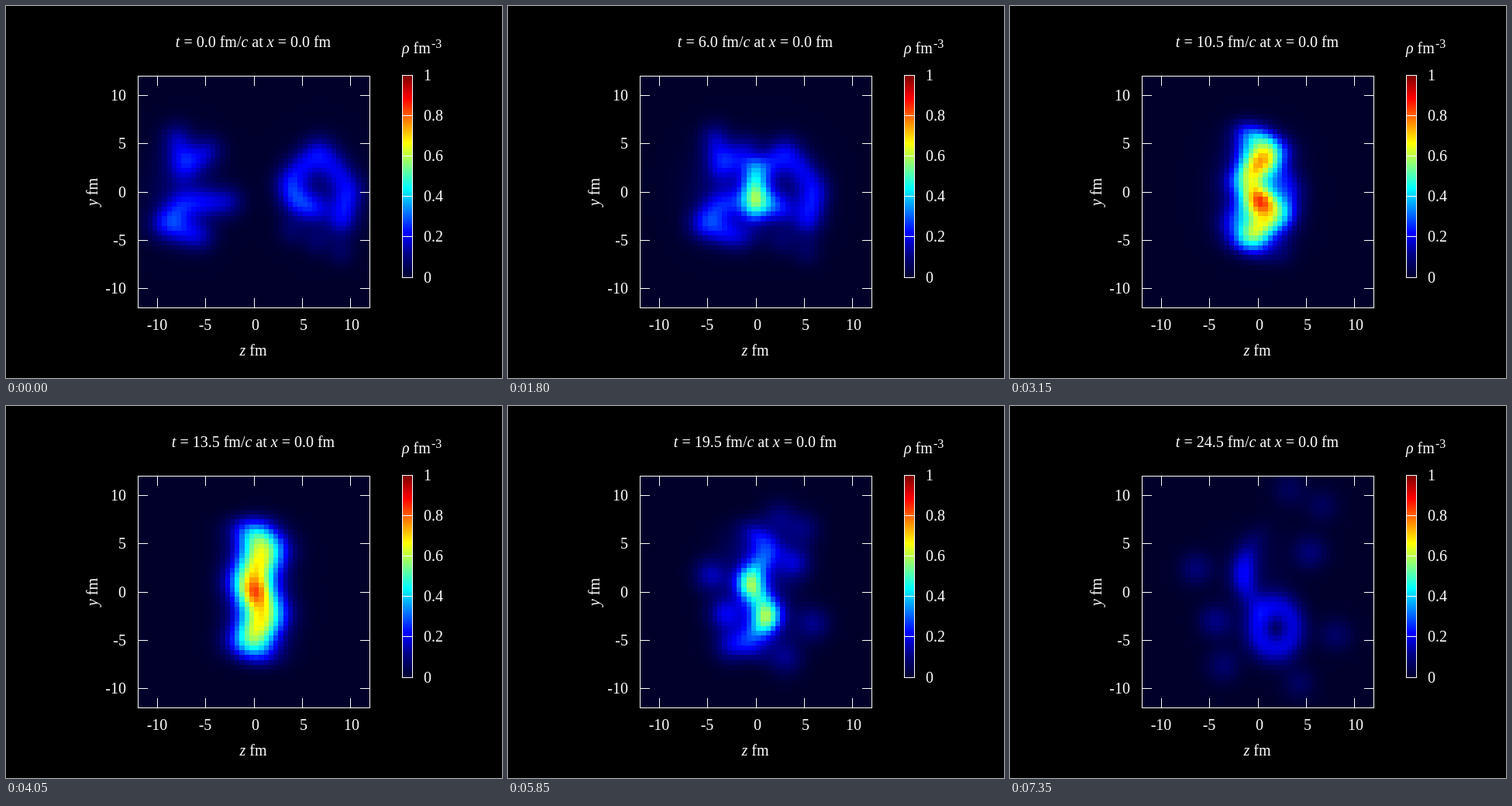
Animation of 640 by 480 pixels, one loop 7.5 s. Source, as an HTML page with a canvas:

```html
<!DOCTYPE html>
<html lang="en">
<head>
<meta charset="utf-8">
<title>Density in a nuclear collision</title>
<style>
  html, body { margin: 0; width: 100%; height: 100%; overflow: hidden; background: #000; }
  canvas, svg { position: absolute; left: 0; top: 0; width: 640px; height: 480px; }
  text { font: 20px "Liberation Serif", "Times New Roman", serif; fill: #fff; }
  .var { font-style: italic; }
  .mid { text-anchor: middle; }
  .end { text-anchor: end; }
  .sup { font-size: 16px; }
  path { fill: none; stroke: #fff; stroke-width: 1; shape-rendering: crispEdges; }
</style>
</head>
<body>
<canvas id="map" width="640" height="480"></canvas>
<svg id="axes" viewBox="0 0 640 480">
  <path id="lines"/>
  <text class="mid" x="319" y="53"><tspan class="var">t</tspan> = <tspan id="clock">0.0</tspan> fm/<tspan class="var">c</tspan> at <tspan class="var">x</tspan> = 0.0 fm</text>
  <text class="mid" x="319" y="451"><tspan class="var">z</tspan> fm</text>
  <text class="mid" transform="translate(118 240) rotate(-90)"><tspan class="var">y</tspan> fm</text>
  <text x="511" y="61"><tspan class="var">ρ</tspan> fm</text>
  <text class="sup" x="549" y="54">-3</text>
</svg>
<script>
const STEP = 150, STEPS = 50, DT = 0.5;
const CELLS = 48, CELL = 6.25, LEFT = 170, TOP = 90;
const SPEED = 0.625;

// Colour stops, evenly spaced over densities 0 to 1
const PALETTE = [
  [0, 0, 43], [0, 0, 128], [0, 0, 255], [0, 128, 255], [0, 255, 255],
  [128, 255, 128], [255, 255, 0], [255, 128, 0], [255, 0, 0], [128, 0, 0]
];

const mix = (a, b, k) => a + (b - a) * k;
const bell = (u, v = 0) => Math.exp(-(u * u + v * v) / 2);
const smooth = (a, b, v) => {
  const k = Math.min(1, Math.max(0, (v - a) / (b - a)));
  return k * k * (3 - 2 * k);
};

function colour(v) {
  const p = Math.min(.9999, Math.max(0, v)) * (PALETTE.length - 1);
  const i = Math.floor(p);
  return `rgb(${PALETTE[i].map((c, n) => Math.round(mix(c, PALETTE[i + 1][n], p - i)))})`;
}

const blob = (z, y, a, sz, sy = sz) => ({ z, y, a, sz, sy });

// Evenly spaced clumps along a bent line
function strand(...points) {
  const clumps = [];
  points.slice(1).forEach(([z2, y2], i) => {
    const [z1, y1] = points[i];
    const n = Math.round(Math.hypot(z2 - z1, y2 - y1) / 1.5);
    for (let k = i ? 1 : 0; k <= n; k++) {
      clumps.push(blob(mix(z1, z2, k / n), mix(y1, y2, k / n), .1, 1.1));
    }
  });
  return clumps;
}

const leftNucleus = [
  blob(-7.3, .2, .08, 2.6, 3.2),
  ...strand([-8, 5.8], [-7.4, 2.4], [-4.6, 4.4]),
  ...strand([-2.4, -1], [-7.4, -1.2], [-9.6, -3.4], [-5.4, -4.6])
];
const rightNucleus = [
  blob(6.8, .2, .06, 2.6, 3.2),
  ...strand([9, -3.4], [9.9, .5], [6.8, 4.5], [3.5, 1.2], [4.2, -1], [6.5, -1.8]),
  ...[0, 1, 2].map(k => blob(3.8 + 2.6 * k, -4 - 1.1 * k, .06, 1))
];

// Matter fades into the hot zone after crossing the middle plane
function moving(nucleus, dir, t) {
  const left = 1 - smooth(9, 14, t);
  return nucleus.map(b => {
    const z = b.z + dir * SPEED * t;
    return { ...b, z, a: b.a * left * (1 - smooth(-1, 2.5, dir * z)) };
  });
}

// Where the light fragments end up
const debris = [
  [5.4, 4.1], [6.6, 8.9], [3.2, 10.6], [-6.4, 2.4],
  [-4.4, -3], [-3.6, -7.6], [4.2, -9.4], [8, -4.4]
];

function fragments(t) {
  const spread = (Math.max(0, t - 12) / 12.5) ** .6;
  const gain = smooth(13, 18, t) * mix(1.5, 1, smooth(19.5, 24.5, t));
  return debris.map(([z, y]) =>
    blob(z * spread, y * spread, (.15 - .008 * Math.hypot(z, y)) * gain, 1.2));
}

// Contact, pile-up, squeeze, peak, split, break-up
const TIMES = [2, 6, 10.5, 13.5, 19.5, 24.5];

function track(t, ...values) {
  if (t <= TIMES[0]) return values[0];
  const n = TIMES.findIndex(time => time >= t);
  return mix(values[n - 1], values[n], (t - TIMES[n - 1]) / (TIMES[n] - TIMES[n - 1]));
}

// A wavy column with a haze, a hot core, and a drop that opens into a ring
function hotZone(t) {
  const at = (...values) => track(t, ...values);
  const peak = at(0, .2, .42, .6, .18, 0), width = at(.7, .9, 1.45, 1.7, 1.15, 1.2);
  const reach = at(1.5, 2.9, 5.7, 6.2, 6, 6);
  const drift = at(1.4, -.2, .1, .35, .2, 0), wave = at(0, 0, .8, .4, .8, .8);
  const haze = at(0, 0, .06, .07, .13, .03);
  const core = {
    a: at(0, .04, .14, .16, .29, .2), z: at(1.2, -.1, .4, .1, -.5, -1.5),
    y: at(-.4, -.4, -.9, .1, .8, 1.9), sy: at(1, 1, 1, 1, 1.2, 2.2),
    bend: at(0, 0, 0, 0, 0, .07)
  };
  const ring = {
    a: at(0, 0, 0, 0, .3, .18), z: at(1, 1, 1, 1, 1.1, 1.8),
    y: at(-2, -2, -2, -2, -2.5, -3.7), r: at(0, 0, 0, 0, 0, 1.8)
  };
  return (z, y) => {
    const ends = bell(((y - .2) / reach) ** 3);
    const spine = drift + wave * Math.cos(.95 * (y - 4.4));
    const dy = y - core.y;
    const fromRing = Math.hypot(z - ring.z, .85 * (y - ring.y)) - ring.r;
    return ends * (peak * bell((z - spine) / width) + haze * bell((z - drift) / 2.4))
      + core.a * bell(z - core.z - core.bend * dy * dy, dy / core.sy)
      + ring.a * bell(fromRing / 1.05);
  };
}

const ctx = document.getElementById("map").getContext("2d");
const edge = i => Math.round(i * CELL);

function drawMap(t) {
  const hot = hotZone(t);
  const blobs = [
    ...moving(leftNucleus, 1, t), ...moving(rightNucleus, -1, t), ...fragments(t)
  ].filter(b => b.a > .0005);
  for (let row = 0; row < CELLS; row++) {
    const y = 12 - (row + .5) / 2;
    for (let col = 0; col < CELLS; col++) {
      const z = (col + .5) / 2 - 12;
      let rho = hot(z, y);
      for (const b of blobs) rho += b.a * bell((z - b.z) / b.sz, (y - b.y) / b.sy);
      ctx.fillStyle = colour(rho);
      ctx.fillRect(LEFT + edge(col), TOP + edge(row),
        edge(col + 1) - edge(col), edge(row + 1) - edge(row));
    }
  }
}

function drawAxes() {
  const svg = document.getElementById("axes");
  const label = (x, y, text, cls) => {
    const el = document.createElementNS(svg.namespaceURI, "text");
    el.setAttribute("x", x);
    el.setAttribute("y", y);
    el.setAttribute("class", cls);
    el.textContent = text;
    svg.append(el);
  };
  let d = "M170.5 90.5H469.5V389.5H170.5ZM511.5 89.5H524.5V350.5H511.5Z";
  for (let v = -10; v <= 10; v += 5) {
    const x = Math.round(LEFT + (v + 12) / 24 * 299);
    const y = Math.round(TOP + (12 - v) / 24 * 299);
    d += `M${x + .5} 90v13m0 274v13M170 ${y + .5}h13m274 0h13`;
    label(x + (v < 0 ? 0 : 2), 418, v, "mid");
    label(155, y + 7, v, "end");
  }
  for (let i = 0; i <= 5; i++) {
    const y = Math.floor(350 - i / 5 * 261);
    if (i % 5) d += `M511 ${y + .5}h14`;
    label(539, y + 7, i / 5, "");
  }
  document.getElementById("lines").setAttribute("d", d);
  for (let y = 90; y < 350; y++) {
    ctx.fillStyle = colour((350 - y) / 260);
    ctx.fillRect(512, y, 12, 1);
  }
}

const clock = document.getElementById("clock");
let shown = -1;

function tick() {
  const step = Math.floor(performance.now() / STEP) % STEPS;
  if (step !== shown) {
    shown = step;
    clock.textContent = (step * DT).toFixed(1);
    drawMap(step * DT);
  }
  requestAnimationFrame(tick);
}

drawAxes();
tick();
</script>
</body>
</html>
```
